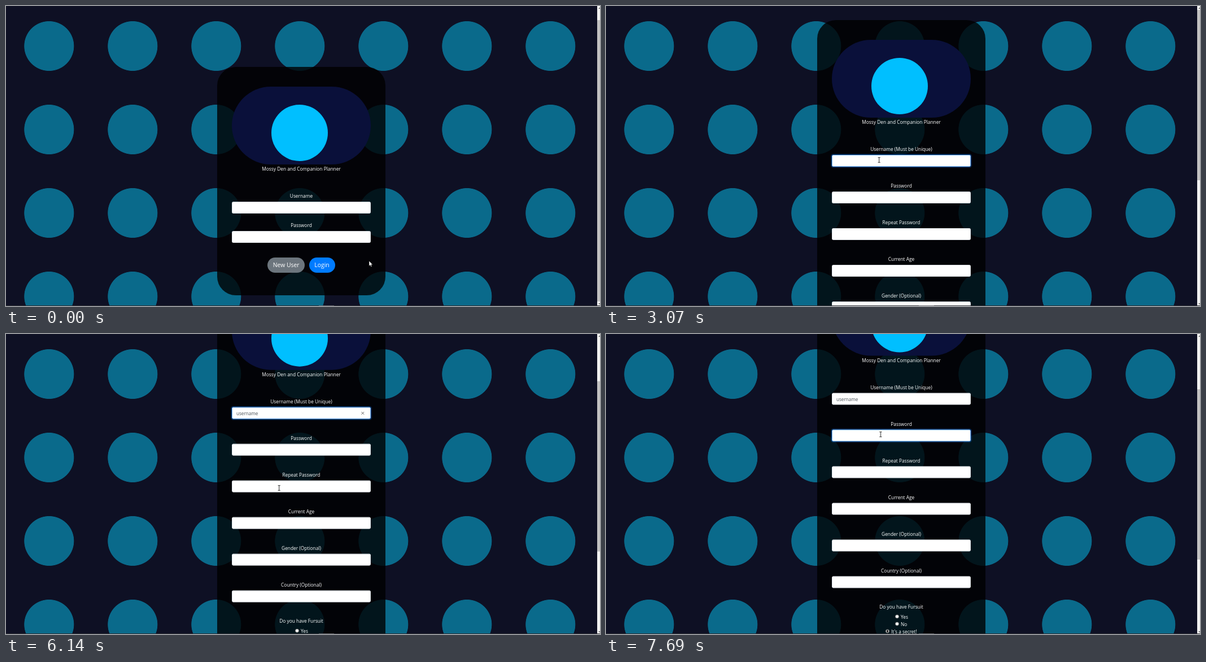
Write an HTML page that moves like this. It is 1052x532 px and loops after 8 s.

```html
<!DOCTYPE html>
<html lang="en">
<head>
<meta charset="utf-8">
<title>Sign up</title>
<style>
  html, body { margin: 0; width: 100%; height: 100%; overflow: hidden; }
  #stage {
    position: absolute; left: 0; top: 0; width: 1052px; height: 532px; overflow: hidden;
    background: radial-gradient(circle at 76.3px 71px, #0a6a8b 43.6px, transparent 44.4px) 0 0 / 148px 148px #0e1024;
    font: 8.35px/12px "Open Sans", "Noto Sans", sans-serif; color: #fff;
  }
  #stage * { box-sizing: border-box; }
  #stage *, .typed::before { animation: 8s linear infinite; }
  .page { position: absolute; inset: 0; }
  .card { position: absolute; left: 374px; width: 298px; background: rgba(0, 0, 0, .8); border-radius: 33px; }

  .brand { position: absolute; left: 400px; width: 246px; }
  .pill { height: 138px; border-radius: 69px; background: #0a103a; }
  .mark { position: absolute; left: 70px; top: 32px; width: 100px; height: 100px; border-radius: 50%; background: #00bfff; }
  p { position: absolute; left: 400px; width: 246px; top: calc(var(--y) * 1px - 6px); margin: 0; text-align: center; white-space: nowrap; }
  .brand p { left: 0; }

  .field {
    position: absolute; left: 400px; top: calc(var(--y) * 1px); width: 246px; height: 21px;
    display: flex; align-items: center; padding-left: 7px;
    background: #fff; border: 1px solid #dfe3e7; border-radius: 2.4px; color: #495057; font-size: 8.15px;
  }
  .caret { width: 1px; height: 11px; background: #333; opacity: 0; }
  .clear { position: absolute; left: 228.2px; top: 7px; width: 5.6px; height: 5.6px; }

  .btn { position: absolute; top: 446px; height: 26.5px; border-radius: 14px; font-size: 10.4px; line-height: 26.5px; text-align: center; white-space: nowrap; }
  #new { left: 463.3px; width: 65.7px; background: #6c757d; }
  #enter { left: 536.5px; width: 46px; background: #007bff; }

  .dot { position: absolute; width: 7px; height: 7px; top: calc(var(--y) * 1px - 3.5px); border-radius: 50%; background: #fff; border: .5px solid #767676; }
  .dot.on { background: radial-gradient(circle, #222 1.6px, #fff 2.1px); }
  .opt { left: calc(var(--x) * 1px); width: auto; }

  .track { position: absolute; right: 0; top: 0; width: 5px; height: 532px; background: #f1f1f1; }
  .track svg { position: absolute; left: 0; top: 0; }
  .thumb { position: absolute; right: 0; width: 5px; background: #c1c1c1; }
  .edge { position: absolute; left: 0; top: 531px; width: 1052px; height: 1px; background: linear-gradient(90deg, #2e2f35 554px, #6a6b70 554px 581px, #2e2f35 581px); }
  .pointer { position: absolute; left: 0; top: 0; overflow: visible; }
  #beam { mix-blend-mode: difference; }

  #stage .login { animation-name: leave; animation-timing-function: step-end; }
  #stage .join { animation-name: arrive; animation-timing-function: step-end; }
  #stage .scroll { animation-name: scroll; }
  #stage .join.thumb { animation-name: arrive, slide; animation-timing-function: step-end, linear; }
  #stage #new { animation-name: hover; }
  #stage #user { animation-name: focus-user; }
  #stage #pass { animation-name: focus-pass; }
  #stage #user .caret { animation-name: blink-user; }
  #stage #pass .caret { animation-name: blink-pass; }
  #stage .clear { animation-name: clear; animation-timing-function: step-end; }
  .typed::before { content: ""; animation-name: type !important; animation-timing-function: step-end !important; }
  #stage #arrow { animation-name: move, arrow; animation-timing-function: linear, step-end; }
  #stage #beam { animation-name: move, beam; animation-timing-function: linear, step-end; }

  @keyframes leave { 0% { visibility: visible; } 17%, 100% { visibility: hidden; } }
  @keyframes arrive { 0% { visibility: hidden; } 17%, 100% { visibility: visible; } }
  @keyframes scroll {
    0%, 75.44% { transform: translateY(0); animation-timing-function: cubic-bezier(.16, 1, .3, 1); }
    80.44%, 100% { transform: translateY(-159.5px); }
  }
  @keyframes slide {
    0%, 75.44% { transform: translateY(0); animation-timing-function: cubic-bezier(.16, 1, .3, 1); }
    80.44%, 100% { transform: translateY(91px); }
  }
  @keyframes hover { 0%, 12.9% { background: #6c757d; } 14.75%, 100% { background: #5a6268; } }
  @keyframes focus-user {
    0%, 30.75%, 90.88%, 100% { border-color: #dfe3e7; box-shadow: 0 0 0 0 rgba(0, 123, 255, 0); }
    32.63%, 89% { border-color: #80bdff; box-shadow: 0 0 0 1.75px rgba(0, 123, 255, .3); }
  }
  @keyframes focus-pass {
    0%, 89% { border-color: #dfe3e7; box-shadow: 0 0 0 0 rgba(0, 123, 255, 0); }
    90.88%, 100% { border-color: #80bdff; box-shadow: 0 0 0 1.75px rgba(0, 123, 255, .3); }
  }
  @keyframes blink-user {
    0%, 30.99% { opacity: 0; }
    31%, 36.5% { opacity: 1; }
    38.3%, 43.3% { opacity: 0; }
    43.75%, 58.4% { opacity: 1; }
    59.7% { opacity: 0; }
    60%, 70.2% { opacity: 1; }
    71.75%, 79.25% { opacity: 0; }
    80.5%, 85.8% { opacity: 1; }
    87%, 100% { opacity: 0; }
  }
  @keyframes blink-pass {
    0%, 88.99% { opacity: 0; }
    89%, 94.2% { opacity: 1; }
    96.1%, 100% { opacity: 0; }
  }
  @keyframes clear { 0% { visibility: hidden; } 43.75% { visibility: visible; } 89%, 100% { visibility: hidden; } }
  @keyframes type {
    0% { content: ""; }
    43.75% { content: "u"; }
    46.12% { content: "us"; }
    50.75% { content: "use"; }
    53.5% { content: "user"; }
    60% { content: "usern"; }
    61.25% { content: "userna"; }
    63.62% { content: "usernam"; }
    65.12%, 100% { content: "username"; }
  }
  @keyframes move {
    0%, 7% { transform: translate(643px, 452px); }
    9.5% { transform: translate(600px, 433px); }
    11.5% { transform: translate(560px, 430px); }
    13.3% { transform: translate(517px, 445px); }
    14.75%, 22.6% { transform: translate(504px, 451px); }
    30.75%, 81% { transform: translate(483.7px, 273px); }
    85%, 100% { transform: translate(486.4px, 178px); }
  }
  /* the text beam shows while the pointer crosses a field */
  @keyframes arrow {
    0% { visibility: visible; } 24.4% { visibility: hidden; }
    25.3% { visibility: visible; } 27.3% { visibility: hidden; }
    28.2% { visibility: visible; } 30.2%, 100% { visibility: hidden; }
  }
  @keyframes beam {
    0% { visibility: hidden; } 24.4% { visibility: visible; }
    25.3% { visibility: hidden; } 27.3% { visibility: visible; }
    28.2% { visibility: hidden; } 30.2%, 100% { visibility: visible; }
  }
</style>
</head>
<body>
<div id="stage">
  <div class="page login">
    <div class="card" style="top:108px;height:405px"></div>
    <div class="brand" style="top:143px">
      <div class="pill"></div><div class="mark"></div>
      <p style="--y:145.5">Mossy Den and Companion Planner</p>
    </div>
    <p style="--y:337">Username</p><div class="field" style="--y:347"></div>
    <p style="--y:388.5">Password</p><div class="field" style="--y:398.7"></div>
    <div class="btn" id="new">New User</div>
    <div class="btn" id="enter">Login</div>
  </div>

  <div class="page join"><div class="page scroll">
    <div class="card" style="top:25px;height:862px"></div>
    <div class="brand" style="top:60.4px">
      <div class="pill"></div><div class="mark"></div>
      <p style="--y:145.2">Mossy Den and Companion Planner</p>
    </div>
    <p style="--y:254">Username (Must be Unique)</p>
    <div class="field" id="user" style="--y:264.4">
      <span class="typed"></span><i class="caret"></i>
      <svg class="clear" viewBox="0 0 6 6"><path d="M.5 .5 5.5 5.5M5.5 .5 .5 5.5" stroke="#444" stroke-width=".9"/></svg>
    </div>
    <p style="--y:319">Password</p>
    <div class="field" id="pass" style="--y:329.4"><i class="caret"></i></div>
    <p style="--y:384">Repeat Password</p><div class="field" style="--y:394.4"></div>
    <p style="--y:448.8">Current Age</p><div class="field" style="--y:459.3"></div>
    <p style="--y:513.7">Gender (Optional)</p><div class="field" style="--y:524.3"></div>
    <p style="--y:578.6">Country (Optional)</p><div class="field" style="--y:589.2"></div>
    <p style="--y:643.4">Do you have Fursuit</p>
    <i class="dot" style="--y:660.5;left:511.5px"></i><p class="opt" style="--x:522;--y:661">Yes</p>
    <i class="dot" style="--y:673.7;left:511.5px"></i><p class="opt" style="--x:522;--y:674.2">No</p>
    <i class="dot on" style="--y:686.8;left:494.5px"></i><p class="opt" style="--x:505;--y:687.3">It's a secret!</p>
  </div></div>

  <div class="track">
    <svg width="5" height="532"><path d="M2 5 4.5 2.5 7 5zM2 527 4.5 529.5 7 527z" fill="#777"/></svg>
  </div>
  <div class="thumb login" style="top:25px;height:499px"></div>
  <div class="thumb join" style="top:7px;height:302px"></div>
  <div class="edge"></div>

  <svg class="pointer" id="arrow" width="8" height="12">
    <path d="M0 0V9.2L2.1 7.3 3.5 10.4 4.9 9.8 3.6 6.8H6.4Z" fill="#fff" stroke="#000" stroke-width=".5"/>
  </svg>
  <svg class="pointer" id="beam" width="8" height="12">
    <path d="M-2-4.4H-.5L0-4 .5-4.4H2M0-4V4M-2 4.4H-.5L0 4 .5 4.4H2" fill="none" stroke="#fff" stroke-width=".9"/>
  </svg>
</div>
</body>
</html>
```
